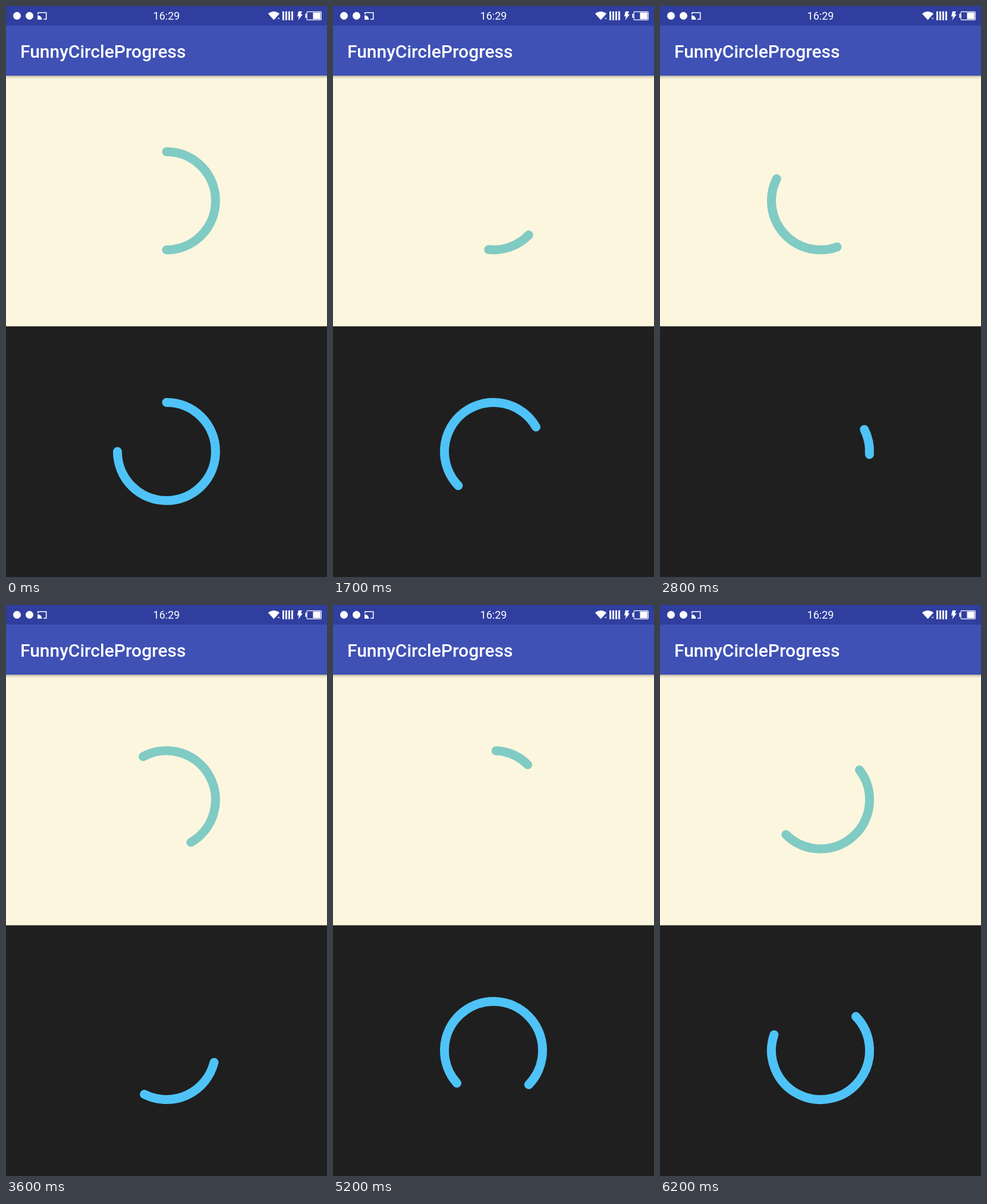
An HTML page for the animation above (6300 ms loop, 540 by 960 pixels).

```html
<!DOCTYPE html>
<html>
<head>
<meta charset="utf-8">
<style>
  html, body { margin: 0; height: 100%; overflow: hidden; background: #1f1f1f; }
  svg { display: block; width: 540px; height: 960px; }
  text { font-family: Roboto, sans-serif; fill: #fff; }
  .arc { fill: none; stroke-width: 15; stroke-linecap: round; }
</style>
</head>
<body>
<svg viewBox="0 0 540 960">
  <defs>
    <linearGradient id="shadow" x2="0" y2="1">
      <stop stop-opacity=".32"/>
      <stop offset=".4" stop-opacity=".12"/>
      <stop offset="1" stop-opacity="0"/>
    </linearGradient>
  </defs>
  <rect width="540" height="960" fill="#1f1f1f"/>
  <rect y="117" width="540" height="421.5" fill="#fdf6df"/>
  <rect y="117" width="540" height="6" fill="url(#shadow)"/>
  <rect width="540" height="117" fill="#3f51b5"/>
  <rect width="540" height="33" fill="#303f9f"/>

  <g fill="#fff">
    <circle cx="18.5" cy="16.5" r="6.5"/>
    <circle cx="39.5" cy="16.5" r="6.5"/>
    <!-- cast -->
    <path d="M53.8 14V11.3H67.7V22.2H63" fill="none" stroke="#fff" stroke-width="1.6"/>
    <path d="M53 15.5A7.5 7.5 0 0 1 60.5 23H53Z"/>
    <!-- wifi -->
    <path d="M441 13Q450.5 5.5 460 13L450.5 23.5Z"/>
    <path d="M456.7 20H460.7L458.7 22.5Z" opacity=".8"/>
    <!-- signal -->
    <path d="M465 9h3v15h-3zm5 0h3v15h-3zm5 0h3v15h-3zm5 0h3v15h-3z"/>
    <!-- charging -->
    <path d="M492 9H498L496 14H499L491.5 24L493 17.5H490Z"/>
    <!-- battery -->
    <rect x="506.2" y="9.6" width="24.2" height="13.8" rx="1.5" fill="none" stroke="#fff" stroke-width="1.2"/>
    <rect x="503.5" y="13" width="2" height="7"/>
    <rect x="516.5" y="11" width="12.5" height="11"/>
  </g>
  <text x="270" y="23" font-size="18" text-anchor="middle">16:29</text>
  <text x="24" y="86.5" font-size="30" font-weight="500">FunnyCircleProgress</text>

  <path class="arc" id="top" stroke="#80cbc4"/>
  <path class="arc" id="bottom" stroke="#4fc3f7"/>
</svg>
<script>
const LOOP = 6300, STEP = 100, START = 478, RADIUS = 82.5;
const KICK = 6.5, SPEED = 0.1795; // degrees, degrees per ms

const spinners = [
  { el: document.getElementById('top'), cy: 327.5, dir: -1, maxSweep: 180, period: 3000 },
  { el: document.getElementById('bottom'), cy: 749, dir: 1, maxSweep: 270, period: 5000 },
];

function point(cy, degrees) {
  const a = degrees * Math.PI / 180;
  return `${270 + RADIUS * Math.cos(a)} ${cy + RADIUS * Math.sin(a)}`;
}

// The sweep eases from +max to -max; each new cycle anchors at the other end.
function drawSpinner({ el, cy, dir, maxSweep, period }, t) {
  const run = Math.max(0, t - START);
  const cycle = Math.floor(run / period), local = run % period;
  const turn = t < STEP ? 0 : KICK + SPEED * local;
  const from = -90 + dir * turn + cycle * (dir * 0.18 * period - maxSweep);
  const sweep = maxSweep * Math.cos(Math.PI * local / period);
  const large = Math.abs(sweep) > 180 ? 1 : 0, clockwise = sweep > 0 ? 1 : 0;
  el.setAttribute('d', `M${point(cy, from)}A${RADIUS} ${RADIUS} 0 ${large} ${clockwise} ${point(cy, from + sweep)}`);
}

const origin = performance.now();
function frame() {
  const t = Math.floor((performance.now() - origin) % LOOP / STEP) * STEP;
  for (const spinner of spinners) drawSpinner(spinner, t);
  requestAnimationFrame(frame);
}
frame();
</script>
</body>
</html>
```
